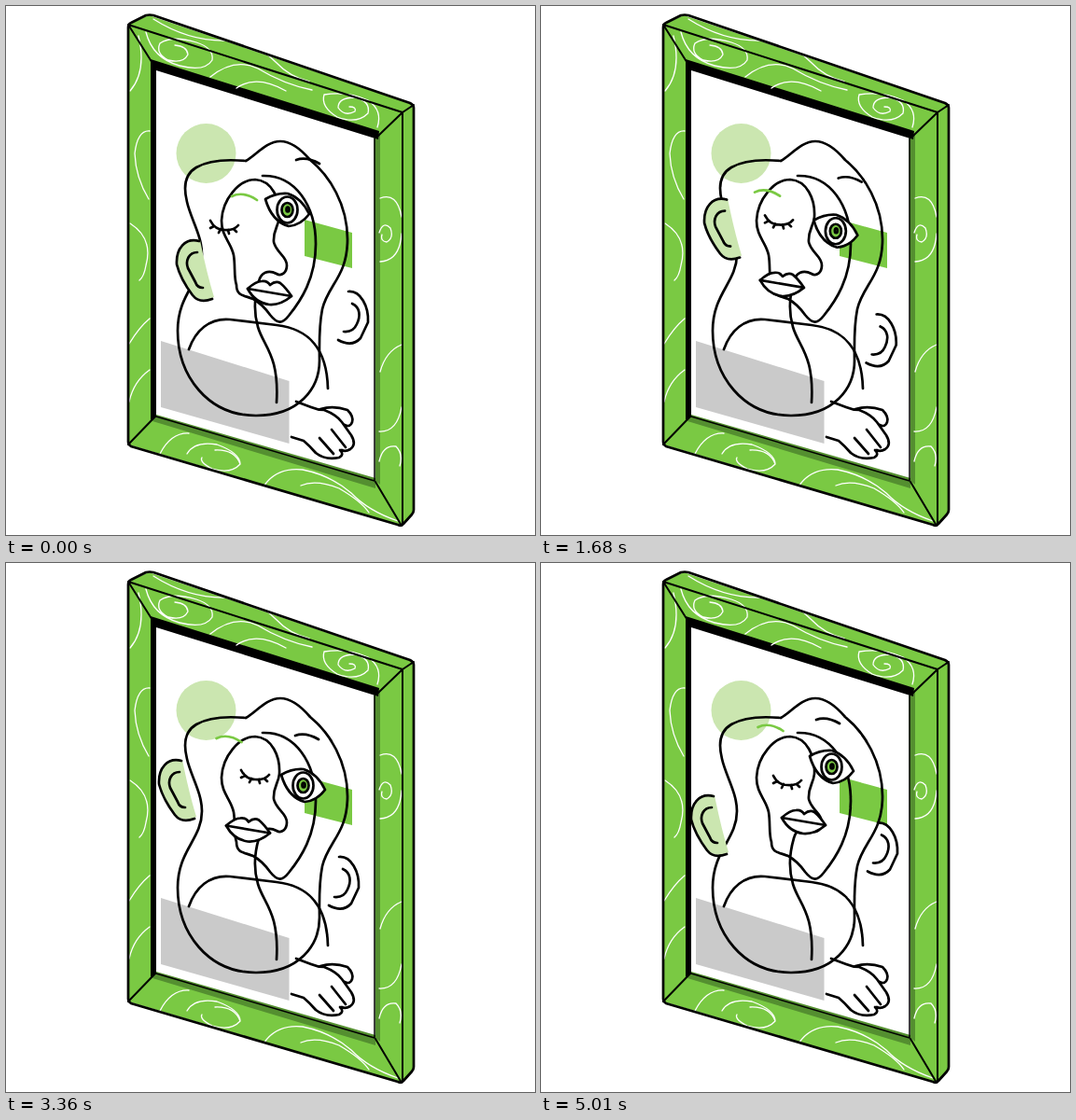
These frames come from a looping animation (567 by 567 pixels, 5040 ms). An HTML page:

```html
<!DOCTYPE html>
<html>
<head>
<meta charset="utf-8">
<style>
html, body { margin: 0; width: 100%; height: 100%; overflow: hidden; background: #fff; }
svg { display: block; width: 100vw; height: 100vh; }
.ink { fill: none; stroke: #000; stroke-width: 2.7; stroke-linecap: round; stroke-linejoin: round; }
.swirl { fill: none; stroke: #fff; stroke-width: 1.3; stroke-linecap: round; }
.white { fill: #fff; }
.green { fill: #7ac943; }
.pale { fill: #cbe6b0; stroke: none; }
</style>
</head>
<body>
<svg viewBox="0 0 567 567">
  <!-- canvas shapes -->
  <path fill="#cacaca" d="M166 359L303.500 402V469L166 430Z"/>
  <circle class="pale" cx="214.500" cy="158" r="32"/>
  <path class="green" d="M320 229L371 243V281L320 268Z"/>

  <!-- head, body and face lines -->
  <g class="ink">
    <path d="M257 166C235 164 216 166 204 173C190 181 191 198 194 210C198 228 210 246 210 266C210 296 184 308 184 348C184 396 216 439 268 439C314 439 336 410 336 380C336 364 335 345 339 325C345 299 366 290 366 250C366 213 347 182 326 165C314 151 304 145 294 145C279 145 268 160 257 166"/>
    <path d="M196 368C203 348 218 334 240 336L290 342C324 346 344 366 345 410"/>
    <path d="M275 182C310 181 332 214 332 255C332 292 316 316 303 332C296 341 291 341 283 331C278 324 272 318 265 314C255 310 247 311 247 299C244 290 246 279 244 267C241 253 231 247 231 230C232 207 250 186 267 186C285 187 294 207 293 226C292 237 286 240 287 253C290 265 301 268 301 278C301 286 295 290 290 287C281 282 273 286 271 295C266 312 265 327 270 344C276 365 293 374 290 425"/>
    <path d="M311 424L327 430Q334 433 341 433Q354 438 360 446L370 460Q376 470 369 475Q364 478 360 476M337 432Q351 428 366 433Q373 440 371 446Q369 452 363 449M306 462L319 466Q326 472 332 479Q342 487 357 484Q363 481 358 476M336 463L351 480M349 454L364 473"/>
  </g>

  <!-- drifting features -->
  <g id="earL" class="ink">
    <path class="pale" d="M208 251C192 248 182 260 183 276C188 290 195 304 202 311Q212 318 223 312Q215 286 208 251Z"/>
    <path d="M207 252C192 248 182 260 183 277C186 289 194 302 200 310Q207 319 221 314M205 264C196 264 192 273 195 281L203 296Q205 302 211 302"/>
  </g>
  <g id="earR" class="ink">
    <path d="M367 306C380 305 389 322 388 339L380 356Q371 366 356 358M371 319C380 323 380 333 376 341Q372 350 362 349"/>
  </g>
  <path id="browL" class="ink" style="stroke:#7ac943" d="M242 204Q254 198 269 208"/>
  <path id="browR" class="ink" d="M311 165Q322 161 336 169"/>
  <path id="lid" class="ink" d="M219 230Q224 240 234 240Q244 241 249 235M223 236L219 238M230 239L228 243M238 240L239 244M244 239L247 242"/>
  <g id="lips" class="ink">
    <path class="white" d="M259 303Q268 295 274 295Q280 294 283 299Q289 294 294 297Q300 302 306 311Q294 321 282 320Q267 318 259 303Z"/>
    <path d="M259 303Q282 307 306 311"/>
  </g>
  <g id="eye" class="ink">
    <path class="white" d="M278 207Q290 200 302 201Q317 206 325 223Q316 235 303 236Q285 231 278 207Z"/>
    <ellipse class="white" cx="301.500" cy="218.500" rx="11" ry="14"/>
    <ellipse class="green" cx="301.500" cy="218.500" rx="6" ry="7.500"/>
    <ellipse cx="302" cy="218" rx="1.500" ry="2.500"/>
  </g>

  <!-- frame -->
  <path class="green" fill-rule="evenodd" d="M131 20L153 10L437 106V543L424 557L131 470ZM161 66V440L396 509L398 140Z"/>
  <path fill="#548f30" d="M394.500 140L401 137V513L396 509ZM161 438L396 506V517L157 445Z"/>
  <path d="M155 57L400 134L399 143L161 69V440L155 444Z"/>
  <g class="swirl">
    <path d="M150 28Q157 56 186 64Q213 71 221 58Q223 45 204 39Q178 31 165 40Q160 51 174 58Q190 62 195 52Q194 43 181 42"/>
    <path d="M158 14Q196 38 236 37Q268 38 289 60Q304 76 325 81"/>
    <path d="M219 76Q245 55 270 67Q298 84 328 90M247 88Q268 73 300 91"/>
    <path d="M398 130Q404 112 388 101Q366 91 341 95Q337 108 355 119Q376 127 388 115Q391 102 374 98Q356 98 356 109Q363 119 374 113Q376 108 368 108"/>
    <path d="M142 32Q151 70 133 91M154 134Q141 133 138 158Q139 184 153 207M133 233Q158 249 150 278Q148 290 143 294M132 362Q143 344 154 335M132 424Q137 402 154 390"/>
    <path d="M401 206Q419 199 424 226M400 243Q404 230 412 238Q416 249 408 253Q401 252 403 245M401 274Q422 273 424 244M401 392Q407 370 424 363M400 456Q419 457 424 430M400 488Q404 470 418 472Q426 480 422 493"/>
    <path d="M165 480Q177 457 196 458M194 480Q202 466 226 470Q251 479 251 491Q241 502 221 496Q207 489 210 484M251 491Q245 475 224 476M276 515Q290 494 318 497Q348 503 370 522Q388 541 420 552M316 514Q332 507 357 517Q381 531 389 543"/>
  </g>
  <g class="ink">
    <path d="M131 23Q131 19 134 18L150 10Q154 9 158 10L433 104Q437 106 437 109V540Q437 543 435 545L426 555Q424 558 420 556L134 472Q131 470 131 467Z"/>
    <path stroke-width="2" d="M131 20L425 114L437 106M425 114V556M131 20L160 66M425 114L398 140M131 470L160 440M424 557L396 510"/>
    <path style="stroke-width:1.500" d="M395 142V509L161 440"/>
  </g>
</svg>
<script>
const LOOP = 5040, STEP = 30;
const times = [0, 2400, 3360, 3930, 5010];
// Offsets [x, y] from the starting pose at each key time
const moves = {
  earL: [[0, 0], [-11.3, -63.5], [-19, -40], [-21, -25], [-22, -2]],
  earR: [[0, 0], [-10.5, 35], [-10, 9], [-9, -6], [-6, -27.5]],
  browL: [[0, 0], [-18.5, -6.2], [-16.5, -16], [-15, -22], [-9.5, -28]],
  browR: [[0, 0], [11, 28], [-1, 20], [-7.5, 14], [-16, 3]],
  lid: [[0, 0], [30, -8], [33, -8], [34.5, -6.5], [30, -2]],
  lips: [[0, 0], [-34.5, -13], [-23, -21.5], [-15, -27], [-1, -30]],
  eye: [[0, 0], [20.5, 32.5], [17, 20], [15, 12], [10, 0]]
};
const parts = Object.entries(moves).map(([id, keys]) => [document.getElementById(id), keys]);

function draw(now) {
  const t = Math.floor(now % LOOP / STEP) * STEP;
  let i = 0;
  while (i < times.length - 2 && t >= times[i + 1]) i++;
  const k = (t - times[i]) / (times[i + 1] - times[i]);
  for (const [el, keys] of parts) {
    const [x, y] = keys[i].map((v, a) => v + (keys[i + 1][a] - v) * k);
    el.setAttribute('transform', `translate(${x} ${y})`);
  }
}

let start;
function tick(now) {
  start ??= now;
  draw(now - start);
  requestAnimationFrame(tick);
}
draw(0);
requestAnimationFrame(tick);
</script>
</body>
</html>
```
